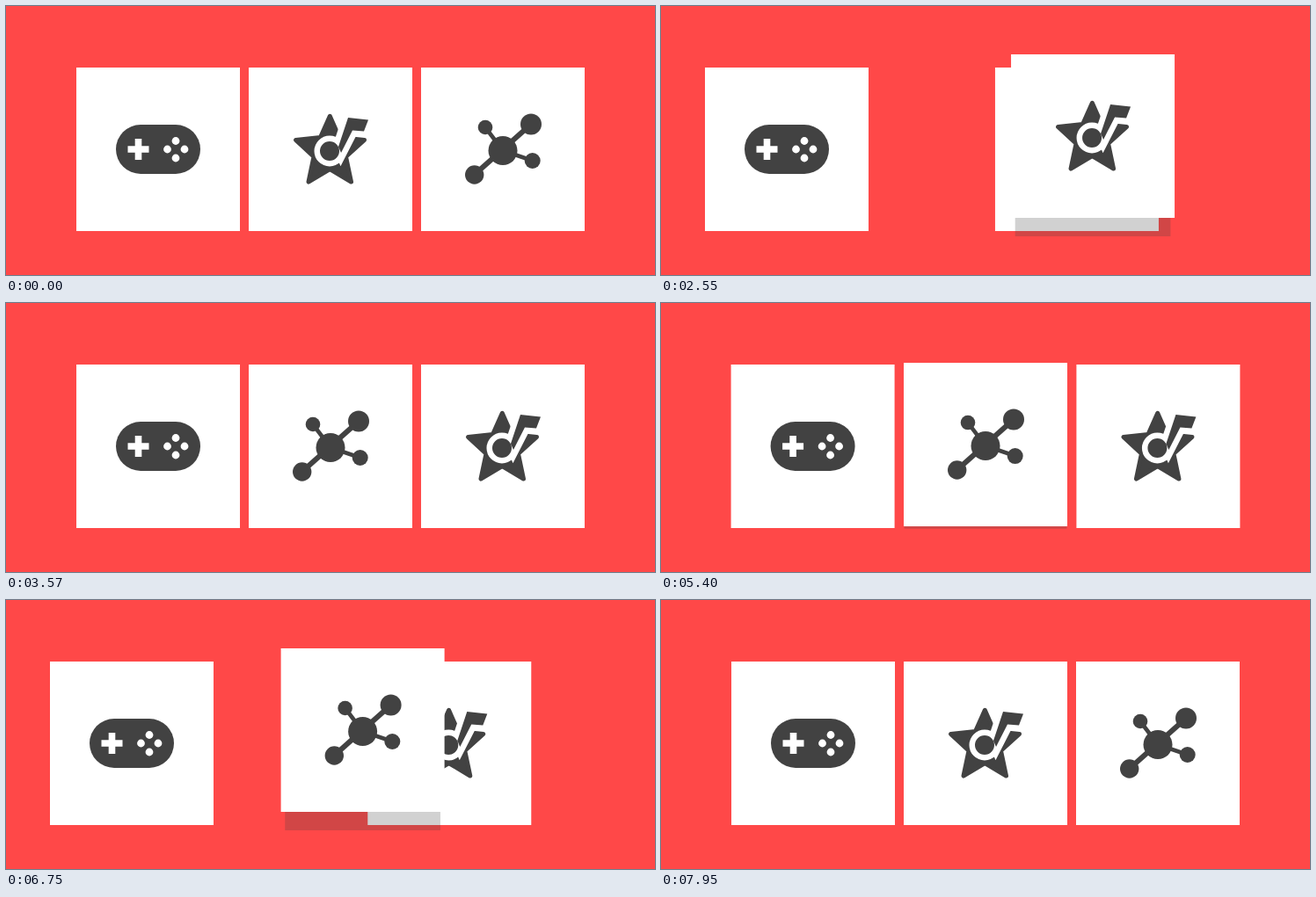
Recreate the animation shown at these times as an HTML page. Size 738 by 306 pixels, loop 7980 ms.

```html
<!DOCTYPE html>
<html lang="en">
<head>
<meta charset="utf-8">
<title>Card swap</title>
<style>
  html, body { margin: 0; width: 100%; height: 100%; overflow: hidden; background: #ff4848; }
  svg { display: block; width: 738px; height: 306px; }
  .paper { fill: #fff; }
  .shadow { fill: #424242; opacity: .24; }
  .ink { fill: #424242; }
  .line { stroke: #424242; fill: none; }
</style>
</head>
<body>
<svg viewBox="0 0 738 306">
  <g id="game">
    <rect class="paper" width="186" height="186"/>
    <rect class="ink" x="45" y="65" width="96" height="56" rx="28"/>
    <path d="M70.5 81v24M58.5 93h24" stroke="#fff" stroke-width="7.6"/>
    <g class="paper">
      <circle cx="113" cy="83.5" r="4.4"/>
      <circle cx="103.5" cy="93" r="4.4"/>
      <circle cx="123" cy="93" r="4.4"/>
      <circle cx="113" cy="103" r="4.4"/>
    </g>
  </g>
  <g id="molecule">
    <rect class="shadow" y="20"/>
    <rect class="paper" width="186" height="186"/>
    <path class="line" stroke-width="6" d="M60.5 122L125 64.5"/>
    <path class="line" stroke-width="4.6" d="M73 68L93 94.5L127 106"/>
    <g class="ink">
      <circle cx="93" cy="94.5" r="16.5"/>
      <circle cx="73" cy="68" r="8.3"/>
      <circle cx="125" cy="64.5" r="12"/>
      <circle cx="126.7" cy="106" r="9"/>
      <circle cx="60.7" cy="122" r="10.7"/>
    </g>
  </g>
  <g id="star">
    <rect class="shadow" y="20"/>
    <rect class="paper" width="186" height="186"/>
    <path class="ink line" style="fill:#424242" stroke-width="5" stroke-linejoin="round"
      d="M92.3 55.3L103 79.5L131.5 82.5L110.5 101.5L116.5 130L92.3 115.5L68 130L74 101.5L53.5 82.5L81.5 79.5Z"/>
    <path class="ink" stroke="#fff" stroke-width="13" paint-order="stroke"
      d="M81 95a11 11 0 1 0 22 0a11 11 0 1 0-22 0ZM113 57L136 59.5L131 72.5L118 71.5L105 97L102 90Z"/>
  </g>
</svg>
<script>
const LOOP = 7980, PASS = 4350;
const LEFT = 80, MIDDLE = 276, RIGHT = 472, TOP = 70, SPREAD = 30, OVERSHOOT = 5;
const [game, star, molecule] = ["game", "star", "molecule"].map(id => document.getElementById(id));
let front = star;

const progress = (t, start, length) => Math.min(1, Math.max(0, (t - start) / length));
const smooth = (...args) => { const p = progress(...args); return p * p * (3 - 2 * p); };
const quad = (...args) => {
  const p = progress(...args);
  return p < .5 ? 2 * p * p : 1 - 2 * (1 - p) ** 2;
};

function place(card, x, lift = 0) {
  card.setAttribute("transform", `translate(${x} ${TOP - lift})`);
  const shadow = card.querySelector(".shadow");
  if (!shadow) return;
  shadow.style.display = lift > 0 ? "" : "none";
  shadow.setAttribute("x", .31 * lift);
  shadow.setAttribute("width", 186 - .62 * lift);
  shadow.setAttribute("height", 166 + 1.4 * lift);
}

function draw(time) {
  const second = time >= 4000;
  const t = second ? time - PASS : time;
  const [lead, other] = second ? [molecule, star] : [star, molecule];
  if (front !== lead) lead.parentNode.append(front = lead);

  // Both moves run past their goal by a few pixels, then settle.
  const spread = (SPREAD + OVERSHOOT) * smooth(t, 1035, 250) - OVERSHOOT * smooth(t, 1285, 180)
    - (SPREAD + OVERSHOOT) * smooth(t, 3045, 300) + OVERSHOOT * smooth(t, 3345, 235);
  const lift = 20 * smooth(t, 1020, 160) - 5 * smooth(t, 1180, 240) - 15 * smooth(t, 2840, 245);

  const right = RIGHT + spread, width = right - MIDDLE;
  place(game, LEFT - spread);
  place(lead, MIDDLE + width * quad(t, 2220, 636), lift);
  place(other, right - width * quad(t, 2220, second ? 404 : 636));
}

function tick() {
  draw(performance.now() % LOOP);
  requestAnimationFrame(tick);
}
tick();
</script>
</body>
</html>
```
